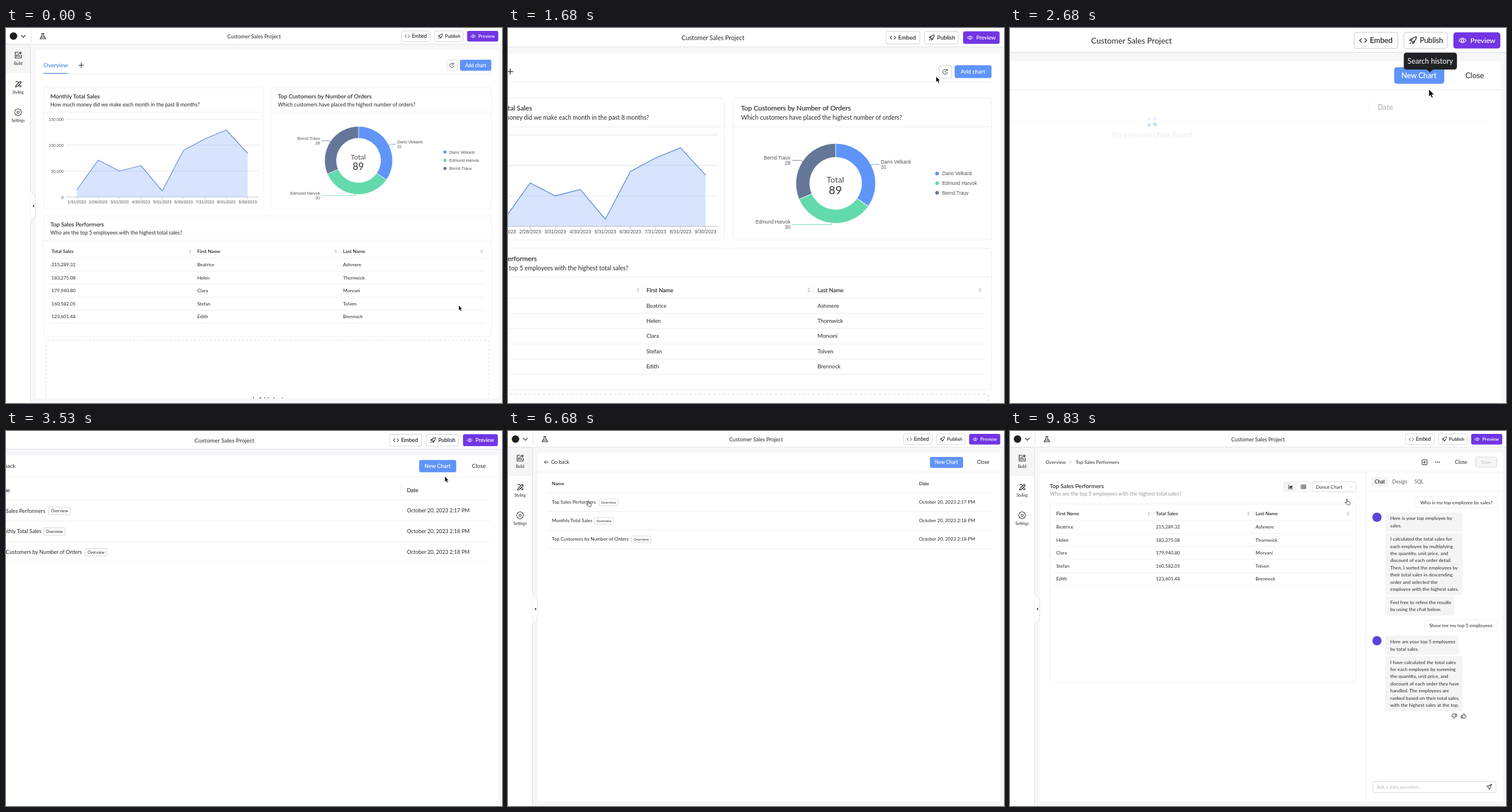
An HTML page that plays this animation: 861 by 650 pixels, repeating every 9.93 s.

```html
<!DOCTYPE html>
<html lang="en">
<head>
<meta charset="utf-8">
<title>Dashboard walkthrough</title>
<style>
html, body { margin: 0; width: 100%; height: 100%; overflow: hidden; background: #fff; }
svg { display: block; width: 100vw; height: 100vh; }
text { font-family: Lato, sans-serif; fill: currentColor; white-space: pre; }
.m { stroke: currentColor; stroke-width: .14; }
.chart { font-family: "Liberation Sans", Arial, sans-serif; }
</style>
</head>
<body>
<svg id="view" viewBox="0 0 861 650"></svg>
<script>
const LOOP = 9930, INK = '#26282c', BLUE = '#5f94f9', GREEN = '#63daab', SLATE = '#657798', HAIR = '#efeff1', EDGE = '#d9d9dc';
const $ = id => document.getElementById(id);

// Drawing helpers; text is placed by its vertical centre.
const text = (x, y, s, size = 8.2, color = INK, attrs = '') =>
  `<text x="${x}" y="${y + size * .36}" font-size="${size}" color="${color}" ${attrs}>${s}</text>`;
const bold = 'class="m"', mid = 'text-anchor="middle"', end = 'text-anchor="end"';
const rect = (x, y, x2, y2, fill = '#fff', stroke = 'none', r = 3, attrs = '') =>
  `<rect x="${x}" y="${y}" width="${x2 - x}" height="${y2 - y}" rx="${r}" fill="${fill}" stroke="${stroke}" ${attrs}/>`;
const path = (d, stroke = INK, w = 1, fill = 'none') =>
  `<path d="${d}" stroke="${stroke}" stroke-width="${w}" fill="${fill}" stroke-linecap="round" stroke-linejoin="round"/>`;
const hline = (x, x2, y, c = HAIR, w = 1) => path(`M${x} ${y}H${x2}`, c, w);
const vline = (x, y, y2, c = HAIR) => path(`M${x} ${y}V${y2}`, c);
const dot = (x, y, r, fill) => `<circle cx="${x}" cy="${y}" r="${r}" fill="${fill}"/>`;
const at = (x, y, s) => `<g transform="translate(${x} ${y})">${s}</g>`;
const group = (id, s) => `<g id="${id}">${s}</g>`;
const loader = (id, x, y, k) => at(x, y, `<g transform="scale(${k})">${group(id,
  [[0, -7.6], [7.6, 0], [0, 7.6], [-7.6, 0]].map(p => dot(...p, 3.2, BLUE)).join(''))}</g>`);

const people = [
  ['215,289.32', 'Beatrice', 'Ashmere'], ['183,275.08', 'Helen', 'Thornwick'],
  ['179,940.80', 'Clara', 'Morvani'], ['160,582.05', 'Stefan', 'Tolven'], ['123,601.48', 'Edith', 'Brennock']];
const heads = ['Total Sales', 'First Name', 'Last Name'];

function table(x, x2, y, gap, order) {
  let s = hline(x - 4, x2, y + 11.7);
  order.forEach((col, i) => {
    const cx = x + i * gap, sx = cx + gap - 12.5;
    s += text(cx, y, heads[col], 8.3, INK, bold)
      + path(`M${sx - 1.5} ${y - 1.2}l1.5-1.7 1.5 1.7zM${sx - 1.5} ${y + 1.2}l1.5 1.7 1.5-1.7z`, '#b5b7bb', .4, '#b5b7bb');
    if (i < 2) s += vline(sx + 7, y - 6, y + 6);
    people.forEach((p, r) => s += text(cx, y + 22.8 + r * 22.5, p[col]));
  });
  people.forEach((p, r) => s += hline(x - 4, x2, y + 34.3 + r * 22.5));
  return s;
}

function shell() {
  const gear = Array.from({ length: 16 }, (_, i) => {
    const a = i * Math.PI / 8, r = i % 2 ? 5.2 : 6.6;
    return `${(r * Math.cos(a)).toFixed(2)} ${(r * Math.sin(a)).toFixed(2)}`;
  });
  return rect(-5, -5, 866, 28, '#fff', '#e2e3e6', 0) + rect(-5, 28.5, 42.5, 660, '#fff', '#dfe0e3', 0)
    + rect(0, 29, 42, 78, '#f5f5f6', 'none', 0)
    + dot(13, 14, 6.5, '#1d1d1f') + path('M26.5 12.5l3.5 3.6 3.5-3.6', INK, 1.1) + vline(43.5, 5, 24, '#dcdde0')
    + path('M62 9.5h4M62.7 9.5v3.6L59 18.8h10l-3.7-5.7V9.5M60.7 16h6.6', INK, 1.1)
    + text(430.5, 14.5, 'Customer Sales Project', 9.2, INK, mid)
    + rect(686.5, 5, 736.5, 23.5, '#fff', EDGE) + path('M695 12l-2.3 2.3 2.3 2.3M698.5 12l2.3 2.3-2.3 2.3', INK, .9)
    + text(704.5, 14.3, 'Embed', 8.6, INK, bold)
    + rect(743.5, 5, 793.5, 23.5, '#fff', EDGE)
    + path('M752 14.5q1.5-4 6-4.3-.2 4.4-4.3 6zM752 14.5l-1.8-.2 1.6-1.8h1.7M753.7 16.2l.2 1.8 1.8-1.6v-1.7M750.5 18l1.3-1.3', INK, .9)
    + text(762, 14.3, 'Publish', 8.4, INK, bold)
    + rect(800.5, 5, 854.5, 23.5, '#7135e3')
    + path('M807 14.3q4-5.2 8 0-4 5.2-8 0z', '#fff', .8) + '<circle cx="811" cy="14.3" r="1.3" fill="none" stroke="#fff" stroke-width=".8"/>'
    + text(820, 14.3, 'Preview', 8.2, '#fff', bold)
    + path('M21 42h-5v10h10.5v-5M18.5 49.5v-3M21 49.5v-5M23.5 49.5v-2M24.7 41v4.6M22.4 43.3h4.6', INK, 1.2)
    + path('M16.5 102.5l1-3 7-7 2 2-7 7zM17 93.5l2.3-1.3 2 2M24 98l2.3 2.5-1.6 1.7-3-2.5', INK, 1.1)
    + at(21, 146, path(`M${gear.join('L')}Z`) + '<circle r="2" fill="none" stroke="#26282c"/>')
    + [['Build', 61.5], ['Styling', 111.5], ['Settings', 161]].map(([s, y]) => text(21, y, s, 6.6, INK, mid)).join('')
    + path('M42.5 278C43 288 51.5 286 51.5 297V320C51.5 331 43 329 42.5 339', '#dfe0e3', 1, '#fff')
    + path('M48.3 306.8l-1.8 1.7 1.8 1.7z', INK, .5, INK);
}

function donut() {
  let a = 0, s = '';
  [[31, BLUE], [30, GREEN], [28, SLATE]].forEach(([n, c]) => {
    const b = a + n / 89 * 2 * Math.PI, p = (r, t) => `${612 + r * Math.sin(t)} ${229.5 - r * Math.cos(t)}`;
    s += path(`M${p(59, a)}A59 59 0 0 1 ${p(59, b)}L${p(38.4, b)}A38.4 38.4 0 0 0 ${p(38.4, a)}Z`, '#fff', .8, c);
    a = b;
  });
  const label = (x, y, name, n, anchor = '') => [name, n].map((v, i) =>
    text(x, y + i * 8.1, v, 7.2, '#505257', `class="chart" ${anchor}`)).join('');
  return s + label(679, 197.5, 'Dario Velkanti', 31) + label(545, 191.5, 'Bernd Trauv', 28, end)
    + label(545, 286.3, 'Edmund Harvok', 30, end)
    + path('M664 203l3.5-1.5H676', BLUE, .8) + path('M548 195.5h12l4 2', SLATE, .8) + path('M548 290.3h58v-2', GREEN, .8)
    + text(611.5, 223.6, 'Total', 12.2, '#4a4d53', mid) + text(611.5, 239.8, '89', 16.8, '#303237', mid)
    + [['Dario Velkanti', BLUE], ['Edmund Harvok', GREEN], ['Bernd Trauv', SLATE]].map(([n, c], i) =>
      dot(762, 215 + i * 14.2, 2.7, c) + text(769.5, 215 + i * 14.2, n, 7.2, '#505257', 'class="chart"')).join('');
}

function areaChart() {
  const ys = [280.5, 229, 248, 238.5, 282.5, 212, 192, 177, 217];
  const days = ['1/31', '2/28', '3/31', '4/30', '5/31', '6/30', '7/31', '8/31', '9/30'];
  const X = i => 123 + i * 37.05, line = 'M' + ys.map((y, i) => `${X(i)} ${y}`).join('L');
  let s = ['150,000', '100,000', '50,000', '0'].map((v, i) =>
    hline(104.5, 438, 158 + i * 45, i < 3 ? '#e4e5e8' : '#c4c6ca')
    + text(100, 158 + i * 45, v, 7.2, '#505257', 'class="chart" ' + end)).join('');
  s += path(`${line}V293H123Z`, 'none', 0, 'rgba(91,143,249,.24)') + path(line, '#5d8ade', 1.2);
  days.forEach((d, i) => s += vline(X(i), 293, 296, '#c4c6ca')
    + text(X(i), 301, d + '/2023', 7.2, '#505257', 'class="chart" ' + mid));
  return s;
}

function dashboard() {
  const card = (x, y, x2, y2, title, sub) => rect(x, y, x2, y2, '#fff', HAIR, 4) + hline(x, x2, y + 42.5)
    + text(x + 12, y + 15, title, 10.1, INK, bold) + text(x + 12, y + 28.8, sub, 9);
  return text(65, 64.5, 'Overview', 10, '#4a80e8', bold) + hline(65, 842, 79.3) + hline(65.5, 106.5, 78.7, '#4a80e8', 1.3)
    + path('M126.5 64.5h8M130.5 60.5v8', INK, 1.1)
    + '<rect id="hist" x="765" y="55.5" width="18.5" height="18.5" rx="3" fill="#fff"/>'
    + '<path id="clock" d="M776.8 62.2A3.7 3.7 0 1 0 777.7 65.2M777.3 60.6v2h-2M774 62.6v2.3l1.6.9" fill="none" stroke-width=".8"/>'
    + rect(788, 55, 842.5, 74, BLUE) + text(815.2, 64.6, 'Add chart', 8.5, '#fff', mid + ' ' + bold)
    + card(65, 103.5, 447.5, 313, 'Monthly Total Sales', 'How much money did we make each month in the past 8 months?')
    + card(460, 103.5, 842.5, 313, 'Top Customers by Number of Orders', 'Which customers have placed the highest number of orders?')
    + card(65, 325.5, 842.5, 534.5, 'Top Sales Performers', 'Who are the top 5 employees with the highest total sales?')
    + areaChart() + donut() + table(79, 832, 387.3, 253, [0, 1, 2])
    + rect(69.5, 541, 838, 690, 'none', '#dcdde0', 4, 'stroke-dasharray="4 3"')
    + path('M426 643.5h7M429.5 640v7', INK, 1.1) + text(438, 643.5, 'Add chart', 10.3, INK, bold);
}

function history() {
  const rows = [['Top Sales Performers', 158, 17], ['Monthly Total Sales', 150, 18], ['Top Customers by Number of Orders', 214.5, 18]];
  return path('M70 54h-6.5M66.3 51l-3 3 3 3', INK, .9) + text(75, 54.2, 'Go back', 8.7)
    + rect(732.5, 45, 790, 64, BLUE) + text(761, 54.3, 'New Chart', 8.5, '#fff', mid + ' ' + bold)
    + text(825, 54.2, 'Close', 8.8, INK, mid) + hline(52, 855, 71)
    + group('wait', loader('spinA', 454, 107.5, .62) + text(454, 123, 'No previous chats found', 8.6, '#d3d6dc', mid))
    + group('head', text(76, 91.3, 'Name', 8.3, INK, bold) + text(713.5, 91.3, 'Date', 8.3, INK, bold)
      + vline(703.5, 84, 98) + hline(68, 841, 107.3))
    + group('rows', rows.map(([s, x, m], i) => {
      const y = 123.5 + i * 32;
      return text(76, y, s, 8.3) + rect(x, y - 5.5, x + 33.3, y + 6, '#fff', EDGE, 2) + text(x + 16.6, y + .4, 'Overview', 6.2, INK, mid)
        + text(713.5, y, `October 20, 2023 2:${m} PM`) + hline(68, 841, y + 16);
    }).join(''));
}

function editor() {
  const ghost = [[69, 88, 165, 97], [69, 100, 239, 109], [335, 90, 467, 104], [470, 90, 601, 104], [69, 478.5, 410, 488], [69, 490.5, 260.5, 500]];
  const bubble = (y, w, h, lines) => rect(651.5, y, 651.5 + w, y + h, '#f4f4f5', 'none', 4)
    + lines.map((s, i) => text(660, y + 10.3 + i * 12.45, s, 8.4)).join('');
  const ask = (x, y, s) => rect(x, y, 845.5, y + 19.5, '#fff', HAIR, 4) + text((x + 845.5) / 2, y + 9.8, s, 8.4, INK, mid);
  const thumb = 'M-4-.5h2v4h-2zM-2-.3L0-4q1.5 0 1.3 1.6L1-1h2.4q.8.2.6 1l-.8 3q-.2.6-1 .6H-2';
  return text(62, 54, 'Overview') + path('M104 51.5l2.5 2.6-2.5 2.6', '#a5a7ab', .8) + hline(52, 855, 71)
    + vline(618, 71, 642, '#ebecee') + hline(618, 855, 103.7)
    + rect(627, 79.5, 657, 95.7, '#f3f3f4') + text(642, 87.6, 'Chat', 8.6, INK, mid + ' ' + bold)
    + text(676.5, 87.6, 'Design', 8.6, '#606268', mid)
    + rect(630, 607.5, 843.5, 626.5, '#fff', EDGE) + text(637, 617, 'Ask a data question...', 8.4, '#b6b8bd')
    + path('M836 612.5l-8.5 3.3 3 1.7 1.5 4zM836 612.5l-5.5 5', INK, .9)
    + group('ghost', ghost.map(g => rect(...g, '#f1f1f2', 'none', 1)).join('')
      + rect(69.5, 127, 601, 464, '#fff', HAIR) + loader('spinB', 335, 295.5, 1))
    + group('fresh', text(114.5, 54, 'New chat') + text(759, 54.2, 'Search history', 8.5, INK, mid)
      + text(825, 54.2, 'Close', 8.8, INK, mid) + text(710, 87.6, 'SQL', 8.6, '#cfd1d5', mid))
    + group('chat', text(114, 53.8, 'Top Sales Performers') + rect(715.3, 49.8, 724, 58.5, 'none', INK, 1)
      + path('M717.5 54.1h4.3M719.7 52v4.3', INK, .9) + [739, 742, 745].map(x => dot(x, 54, .9, INK)).join('')
      + text(783, 53.8, 'Close', 8.8, INK, mid) + rect(808.5, 45, 845, 63, '#f5f5f6', EDGE) + text(826.7, 54, 'Save', 8.4, '#bdbfc3', mid)
      + text(710, 87.6, 'SQL', 8.6, '#606268', mid)
      + ask(704.5, 113.8, 'Who is my top employee by sales?') + ask(719.5, 327.3, 'Show me my top 5 employees')
      + dot(637, 149.5, 8, '#5b42dc') + dot(637, 363.5, 8, '#5b42dc')
      + bubble(141, 134, 33, ['Here is your top employee by', 'sales.'])
      + bubble(176.8, 134, 107.5, ['I calculated the total sales for', 'each employee by multiplying', 'the quantity, unit price, and',
        'discount of each order detail.', 'Then, I sorted the employees by', 'their total sales in descending', 'order and selected the', 'employee with the highest sales.'])
      + bubble(286.7, 119.5, 33, ['Feel free to refine the results', 'by using the chat below.'])
      + bubble(354.8, 127.5, 33, ['Here are your top 5 employees', 'by total sales.'])
      + bubble(390.2, 134, 95.3, ['I have calculated the total sales', 'for each employee by summing', 'the quantity, unit price, and',
        'discount of each order they have', 'handled. The employees are', 'ranked based on their total sales,', 'with the highest sales at the top.'])
      + at(771, 494, `<g transform="rotate(180)">${path(thumb, INK, .9)}</g>`) + at(787.5, 494, path(thumb, INK, .9)))
    + group('result', text(69, 95, 'Top Sales Performers', 10.2, INK, bold)
      + text(69, 109, 'Who are the top 5 employees with the highest total sales?', 9, '#97999e')
      + rect(474.5, 88, 521, 105.3, '#fff', '#eaeaec') + rect(474.5, 88, 498, 105.3, '#f3f3f4')
      + path('M483.5 93.3v6.8h7', INK, .8) + path('M485.2 98.5v-1.8l1.6-1.6 1.3 1 1.6-1.8v4.2z', INK, .3, INK)
      + path('M505.5 93.5h8v6.5h-8zM505.5 95.7h8M505.5 97.9h8M508.2 93.5v6.5M510.9 93.5v6.5', INK, .7)
      + rect(524.5, 88, 601, 105.3, '#fff', EDGE) + text(531, 96.8, 'Donut Chart', 8.4)
      + path('M589.5 95.7l2.2 2.3 2.2-2.3', '#b5b7bb', .8)
      + rect(69.5, 126.5, 601, 435, '#fff', HAIR, 4) + table(80.3, 595, 143.4, 173, [1, 0, 2]));
}

$('view').innerHTML = group('stage',
  rect(0, 0, 861, 650, '#f7f7f9', 'none', 0) + rect(52, 38, 855, 650, '#fff', 'none', 2)
  + group('dash', dashboard()) + group('list', history()) + group('edit', editor())
  + rect(43, 642, 861, 650, '#f7f7f9', 'none', 0) + shell()
  + group('tip', rect(743.5, 28.3, 804.6, 47.7, '#212225', 'none', 3) + path('M770 47.5l3.5 3 3.5-3z', '#212225', .5, '#212225')
    + text(774, 38, 'Search history', 8.4, '#fff', mid))
  + group('cursor',
    group('arrow', path('M0 0V8.5L1.9 6.8 3.3 9.9 4.8 9.2 3.4 6.3H6Z', '#fff', .5, '#000'))
    + group('hand', path('M-1 5.5V.8a.9.9 0 0 1 1.8 0V4l3.6.8q1.2.3 1 1.6l-.5 2.6q-.2 1-1.2 1H1.2q-.8 0-1.4-.7L-3 6.6q-.6-.8.2-1.2.7-.3 1.8.9z', '#222', .8, '#fff'))));

// Pointer stops: time, x, y.
const stops = [[50, 786, 481], [530, 778, 323], [950, 778, 323], [1680, 760.5, 71.5], [1830, 773.3, 70], [2400, 773.3, 70], [2600, 772.3, 70.3],
  [3950, 772.3, 70.3], [4470, 358, 150], [4740, 358, 150], [5140, 139.5, 121], [6700, 139.5, 121], [7500, 203, 131],
  [8000, 203, 131], [8600, 432, 354], [9050, 432, 354], [9320, 463, 167], [9690, 463, 167], [9830, 585, 118]];
const ramp = (t, a, b) => Math.min(1, Math.max(0, (t - a) / (b - a)));
const smooth = p => p * p * (3 - 2 * p);
const cubic = p => p < .5 ? 4 * p ** 3 : 1 - 4 * (1 - p) ** 3;

function pointer(t) {
  let [, x, y] = stops[0];
  for (let i = 1; i < stops.length; i++) {
    const [a, x0, y0] = stops[i - 1], [b, x1, y1] = stops[i];
    if (t < a) break;
    const p = smooth(ramp(t, a, b));
    x = x0 + (x1 - x0) * p;
    y = y0 + (y1 - y0) * p;
  }
  return [x, y];
}
const during = (t, a, b) => t >= a && t < b;
const show = (id, on) => $(id).style.display = on ? '' : 'none';
const fade = (id, o) => $(id).setAttribute('opacity', o);

function spin(id, t) {
  $(id).setAttribute('transform', `rotate(${(t - 7950) * .3 + 2})`);
  [...$(id).children].forEach((c, i) => c.setAttribute('opacity', .6 + .4 * Math.cos((i - .7) * 1.2 + (t - 7950) / 1000 * Math.PI)));
}

function draw(t) {
  const z = 1 + .51 * (cubic(ramp(t, 1280, 2192)) - cubic(ramp(t, 2980, 3880)));
  $('stage').setAttribute('transform', `translate(${861 * (1 - z)} 0) scale(${z})`);
  show('dash', t < 2350);
  show('list', during(t, 2350, 6720));
  show('edit', t >= 6720);
  const over = during(t, 1800, 2350);
  $('hist').setAttribute('stroke', over ? '#b3c4ea' : EDGE);
  $('clock').setAttribute('stroke', over ? '#8ba6e6' : INK);
  fade('tip', ramp(t, 1950, 2080) - ramp(t, 2700, 2850));
  fade('wait', 1 - ramp(t, 2560, 2790));
  fade('head', ramp(t, 2620, 2800));
  fade('rows', ramp(t, 2690, 2850));
  show('fresh', t < 8450);
  show('chat', t >= 8450);
  const ready = ramp(t, 8600, 8840);
  fade('ghost', 1 - ready);
  fade('result', ready);
  spin('spinA', t);
  spin('spinB', t);
  const hand = during(t, 1830, 2400) || during(t, 5080, 6720) || t >= 9800;
  show('hand', hand);
  show('arrow', !hand);
  $('cursor').setAttribute('transform', `translate(${pointer(t)})`);
}

const start = performance.now();
function tick() {
  draw((performance.now() - start) % LOOP);
  requestAnimationFrame(tick);
}
tick();
</script>
</body>
</html>
```
